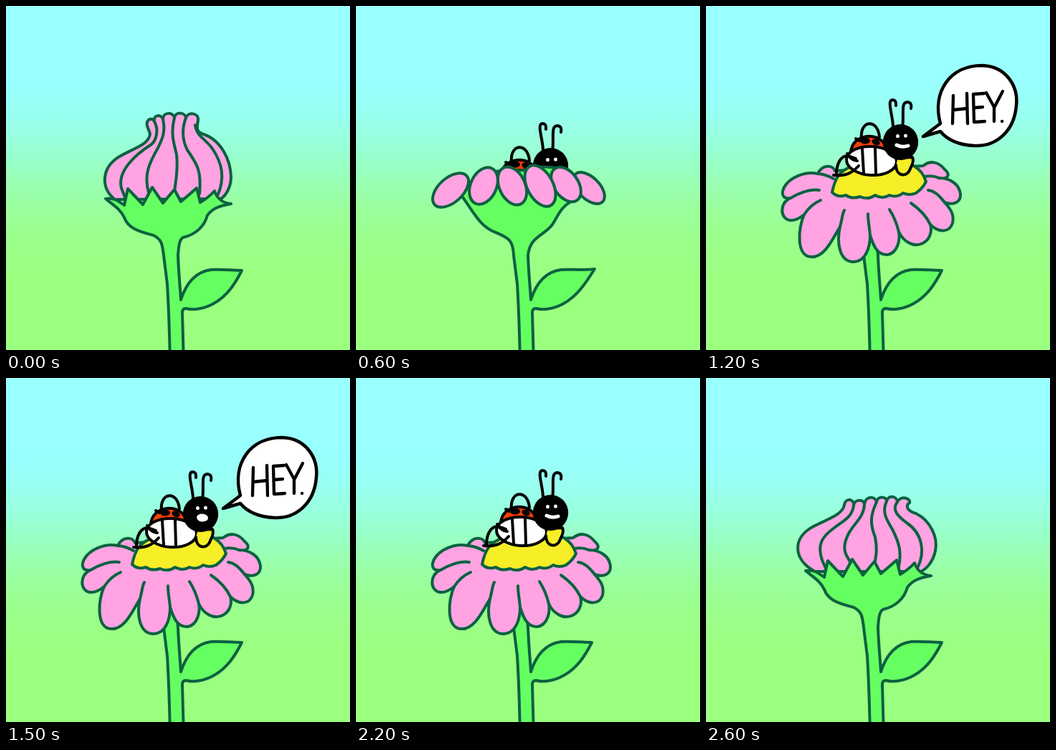
Animation of 480x480 px, one loop 2700 ms. Source, as an HTML page with a canvas:

```html
<!DOCTYPE html>
<html lang="en">
<head>
<meta charset="utf-8">
<title>Ladybug in a flower</title>
<style>
html, body { margin: 0; width: 100%; height: 100%; overflow: hidden; }
canvas { display: block; width: 480px; height: 480px; }
</style>
</head>
<body>
<canvas id="stage" width="480" height="480"></canvas>
<script>
const ctx = document.getElementById('stage').getContext('2d');
const PINK = '#ffa3e3', GREEN = '#66ff62', EDGE = '#0b6240';
const YELLOW = '#f6ee27', RED = '#fb3f05', BLACK = '#000', WHITE = '#fff';
const LOOP = 2700;

const sky = ctx.createLinearGradient(0, 0, 0, 480);
[[0, '#99ffff'], [0.22, '#99ffff'], [0.32, '#99fff0'], [0.4, '#99ffda'],
 [0.5, '#99ffb8'], [0.58, '#9aff9f'], [0.67, '#9bff8c'], [0.8, '#9bff80'], [1, '#9bff80']]
  .forEach(([at, color]) => sky.addColorStop(at, color));

function shape(d, fill, stroke = EDGE, width = 4) {
  const p = new Path2D(d);
  if (fill) { ctx.fillStyle = fill; ctx.fill(p); }
  if (stroke) { ctx.strokeStyle = stroke; ctx.lineWidth = width; ctx.stroke(p); }
}

function oval(x, y, rx, ry, deg, fill, stroke, width = 4) {
  ctx.beginPath();
  ctx.ellipse(x, y, rx, ry, deg * Math.PI / 180, 0, Math.PI * 2);
  ctx.fillStyle = fill;
  ctx.fill();
  if (stroke) { ctx.strokeStyle = stroke; ctx.lineWidth = width; ctx.stroke(); }
}

function shifted(dy, draw) {
  ctx.save();
  ctx.translate(0, dy);
  draw();
  ctx.restore();
}

// Stem and leaf in one outline, with a given top running from left to right.
function stem(top, tip = '329,369') {
  shape(`M229,500 C228,450 227,420 225,388 L220,348 ${top} 240,348
    C241,375 243,392 244,410 C251,388 263,371 286,368 C300,367 315,369 ${tip}
    C319,389 308,405 290,415 C278,422 262,425 251,422 Q246,422 246,428
    L248,500 Z`, GREEN);
}

const CALYX = `C218,331 217,326 206,320 C182,314 170,309 165,295
  C159,283 151,279 139,269 C150,267 157,272 165,278 L170,255 L191,277
  L204,253 L219,275 L235,256 L244,273 Q257,262 266,254 L271,274
  Q283,267 291,258 Q296,274 314,276 C296,279 288,283 281,292
  C277,307 265,319 247,323 C242,326 241,334`;

const BOWL = `C219,326 213,324 195,316 C172,308 163,285 146,263
  C165,240 185,230 205,230 L240,229 C250,223 280,223 290,230 Q300,240 302,272
  C285,280 281,295 274,305 C262,321 243,321`;

function bud(body, lines) {
  shape(body, PINK);
  shape(lines);
  stem(CALYX);
}

function closedBud() {
  bud(`M152,270 C132,254 132,225 160,209 C180,198 199,193 201,179
    C200,172 195,168 197,162 C199,156 206,157 207,161 C205,151 217,151 219,158
    C219,147 234,148 235,156 C236,147 250,148 251,156 C254,147 269,149 268,159
    C267,169 264,174 273,178 C300,186 313,214 314,238 C314,253 307,264 300,269 Z`,
    `M207,161 C214,174 209,188 203,193 C181,207 155,230 161,254 L166,267
     M219,158 C223,175 218,186 212,198 C200,219 192,235 199,260
     M235,156 C230,177 233,188 238,207 C240,224 238,240 235,258
     M251,156 C245,172 246,187 253,201 C267,221 273,230 270,262
     M264,166 C266,182 277,184 288,199 C302,220 306,240 295,265`);
}

function looseBud() {
  bud(`M152,270 C121,253 120,223 150,207 C172,196 191,190 193,177
    C195,166 207,169 206,178 C207,168 222,169 221,177 C222,164 236,164 238,173
    C239,164 252,165 252,172 C254,162 267,165 267,173 C272,163 286,168 284,174
    C277,179 282,186 293,189 C313,199 324,222 320,241 C317,256 308,266 300,270 Z`,
    `M206,178 C204,194 192,199 179,209 C161,222 155,233 162,254 L168,268
     M221,177 C220,195 206,203 198,219 C189,238 194,247 204,260
     M238,173 C230,190 228,202 236,222 C239,237 238,246 235,260
     M252,172 C245,187 252,198 260,211 C270,231 273,243 269,263
     M267,173 C258,184 269,194 280,202 C301,216 307,242 295,265`);
}

function petals(list) {
  list.forEach(p => oval(...p, PINK, EDGE));
}

function cup() {
  petals([[145, 240, 36, 18, 38], [318, 240, 36, 17, 140], [180, 230, 36, 19, 65],
    [290, 230, 36, 19, 115], [218, 224, 36, 19, 82], [256, 224, 36, 19, 98]]);
  stem(CALYX);
}

function halfOpen() {
  shape('M198,240 C204,222 218,219 236,220 L280,230', GREEN);
  bug(35);
  stem(BOWL, '333,367');
  petals([[325, 254, 27, 15, 45], [293, 249, 27, 17, 55], [257, 251, 31, 18, 62],
    [218, 251, 28, 18, 65], [132, 257, 30, 17, -42], [178, 251, 27, 18, -65]]);
}

const SKIRT = `M180,230 C177,221 162,221 156,234 C137,230 116,240 109,253
  C104,263 108,270 118,268 C102,274 103,297 117,299 Q126,300 137,291
  C128,310 126,349 146,350 C166,352 178,322 187,308
  C182,330 186,357 206,357 C224,356 229,335 229,320
  C233,332 238,348 253,347 C268,345 271,325 269,315
  C276,330 290,336 300,332 C312,328 316,315 313,305
  C325,317 340,316 344,303 C347,290 340,282 333,274
  C344,278 356,275 355,262 C353,248 340,240 325,240
  C339,242 341,235 333,228 C324,217 313,215 303,223 Z`;

const FOLDS = `M156,234 Q168,235 178,241 M118,268 C130,261 145,255 158,257
  M137,291 Q146,277 160,271 M187,308 C190,298 190,290 193,285
  M229,320 C228,308 226,300 226,290 M269,315 Q265,298 256,284
  M313,305 C307,292 296,282 286,275 M333,274 Q321,258 310,257
  M325,240 Q316,236 305,238`;

const DISC = `M176,260 C180,240 186,229 208,222 C235,214 270,215 290,223
  Q303,231 307,245 Q302,255 293,261 Q284,265 275,261
  Q266,268 256,264 Q246,270 236,264 Q226,271 215,266
  Q204,270 195,264 Q184,268 176,260 Z`;

function bloom(squash, discY, bugY, mouth) {
  stem(squash < 1 ? BOWL : 'L219,310 L236,310 L');
  ctx.save();
  ctx.translate(0, 252 * (1 - squash));
  ctx.scale(1, squash);
  shape(SKIRT, PINK);
  shape(FOLDS);
  ctx.translate(0, discY);
  shape(DISC, YELLOW);
  ctx.restore();
  bug(bugY, mouth);
}

const SMILE = 'M266,192 Q274,196 282,193';

function bug(dy, talking) {
  shifted(dy, () => {
    // shell, raised knee and belly
    shape('M217,184 C214,156 240,155 242,181', null, BLACK);
    shape('M202,202 C204,176 242,171 252,196 L240,205 Z', RED, BLACK);
    shape('M209,183 L214,186', null, BLACK);
    oval(222, 186, 7, 4.5, 0, BLACK);
    oval(237, 188, 6, 4, 25, BLACK);
    oval(231, 214, 35, 20, 3, WHITE, BLACK);
    shape('M218,197 L220,231 M236,196 L237,232', null, BLACK);
    // limbs
    shape(`M178,234 C196,236 205,230 213,221
      M182,233 C182,218 188,207 198,207 L209,211
      M197,204 Q203,214 211,214`, null, BLACK);
    shape('M265,220 C265,236 281,238 285,225 Q291,214 288,209 L268,210', YELLOW, BLACK);
    // head
    shape(`M261,167 C261,151 252,130 260,129 Q266,129 265,137
      M274,167 C277,151 271,132 281,132 Q288,133 286,141`, null, BLACK);
    oval(271.5, 188, 24.7, 25, 0, BLACK);
    oval(267.5, 179.5, 2.4, 2.6, 0, WHITE);
    oval(278.5, 179, 2.4, 2.6, 0, WHITE);
    if (talking) oval(274, 193, 8, 5.5, 5, WHITE);
    else shape(SMILE, null, WHITE, 5);
  });
}

function bubble() {
  shape(`M327,164 C315,119 341,83 385,83 C419,84 436,112 433,139
    C430,175 405,196 375,195 C352,194 337,187 327,175 L303,182 Z`, WHITE, BLACK, 4.5);
  // hand-lettered HEY.
  shape(`M345,125 L344,164 M364,122 L365,164 M345,145 L364,143
    M388,122 L373,123 L374,162 L389,161 M374,142 L386,141
    M391,121 L402,141 M414,119 L402,142 L402,161 M413,161 L413.2,161`, null, BLACK, 4.3);
}

function render(step) {
  ctx.fillStyle = sky;
  ctx.fillRect(0, 0, 480, 480);
  if (step < 4) closedBud();
  else if (step === 4 || step === 26) looseBud();
  else if (step === 5 || step === 25) cup();
  else if (step === 6 || step === 24) halfOpen();
  else if (step === 7 || step === 23) bloom(0.65, 0, 14);
  else if (step === 8 || step === 22) bloom(1, 0, 0);
  else if (step === 9 || step === 21) bloom(1, -2, -3);
  else {
    const speaking = step >= 12 && step < 20;
    bloom(1, 0, 2, speaking && step % 2 === 1);
    if (speaking) bubble();
  }
}

ctx.lineJoin = ctx.lineCap = 'round';
const start = performance.now();
let shown = -1;

function tick() {
  const step = Math.floor(((performance.now() - start) % LOOP) / 100);
  if (step !== shown) render(shown = step);
  requestAnimationFrame(tick);
}
tick();
</script>
</body>
</html>
```
